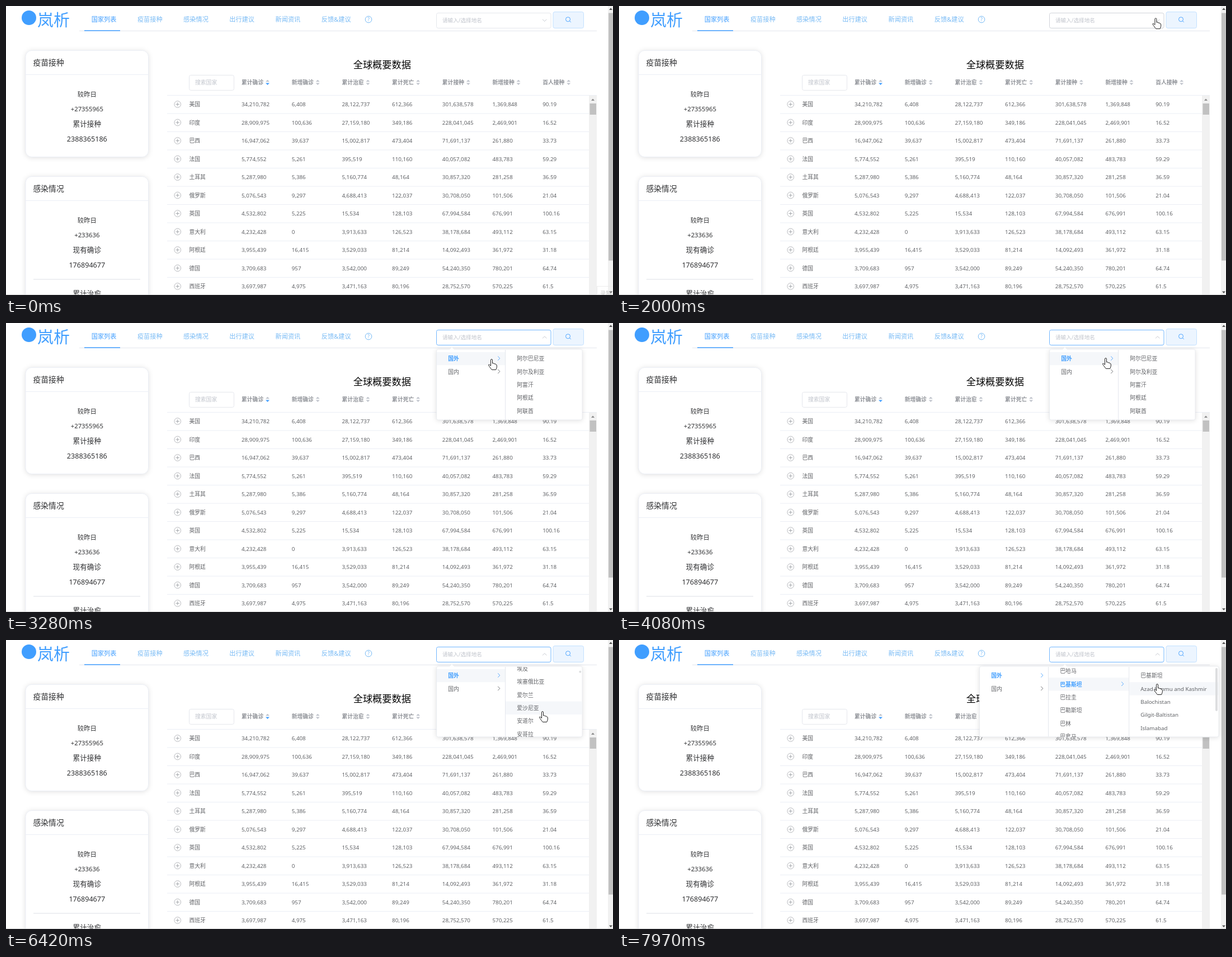
Write an HTML page that moves like this. It is 1085 by 516 pixels and loops after 8 s.

```html
<!DOCTYPE html>
<html lang="zh-CN">
<head>
<meta charset="utf-8">
<style>
html, body { margin: 0; height: 100%; overflow: hidden; background: #fff; }
svg { display: block; }
text { font-family: "Noto Sans", "Noto Sans CJK SC", sans-serif; white-space: pre; }
.box { stroke-width: .75; }
.shadow { filter: drop-shadow(0 1.4px 4px rgba(0, 0, 0, .12)); }
</style>
</head>
<body>
<svg width="1085" height="516" viewBox="0 0 1085 516">
<g id="hover"></g><g id="page"></g><g id="live"></g>
</svg>
<script>
const BLUE = '#409eff', PALE = '#79bbf5', GREY = '#606266', DARK = '#303133', MUTE = '#c0c4cc';
const EDGE = '#dcdfe6', LINE = '#ebeef5', SOFT = '#f5f7fa';
const ROW = 32.5, COL = 89.7, ITEM = 23.4, LOOP = 8000;

// cy is the middle of the line of text
const text = (s, x, cy, size = 9.8, fill = GREY, more = '') =>
  `<text x="${x}" y="${cy + size * .37}" font-size="${size}" fill="${fill}" ${more}>${s}</text>`;
const mid = (s, x, cy, size, fill) => text(s, x, cy, size, fill, 'text-anchor="middle"');
const rect = (x, y, w, h, fill, more = '') =>
  `<rect x="${x}" y="${y}" width="${w}" height="${h}" fill="${fill}" ${more}/>`;
const box = (x, y, w, h, fill, stroke) => rect(x, y, w, h, fill, `rx="3" stroke="${stroke}" class="box"`);
const path = (d, stroke, width = 1, fill = 'none') =>
  `<path d="${d}" fill="${fill}" stroke="${stroke}" stroke-width="${width}"/>`;
const tri = (x, y, w, h, fill) => `<path d="M${x - w} ${y}h${2 * w}l${-w} ${h}z" fill="${fill}"/>`;
const ring = (x, y, r, stroke, width = .8) =>
  `<circle cx="${x}" cy="${y}" r="${r}" fill="none" stroke="${stroke}" stroke-width="${width}"/>`;

// the wording of the table; thousands separators are added when drawn
const countries = `美国 34210782 6408 28122737 612366 301638578 1369848 90.19
印度 28909975 100636 27159180 349186 228041045 2469901 16.52
巴西 16947062 39637 15002817 473404 71691137 261880 33.73
法国 5774552 5261 395519 110160 40057082 483783 59.29
土耳其 5287980 5386 5160774 48164 30857320 281258 36.59
俄罗斯 5076543 9297 4688413 122037 30708050 101506 21.04
英国 4532802 5225 15534 128103 67994584 676991 100.16
意大利 4232428 0 3913633 126523 38178684 493112 63.15
阿根廷 3955439 16415 3529033 81214 14092493 361972 31.18
德国 3709683 957 3542000 89249 54240350 780201 64.74
西班牙 3697987 4975 3471163 80196 28752570 570225 61.5`.split('\n');
const heads = '累计确诊 新增确诊 累计治愈 累计死亡 累计接种 新增接种 百人接种'.split(' ');
const tabs = '国家列表 疫苗接种 感染情况 出行建议 新闻资讯 反馈&amp;建议'.split(' ');
const abroad = '阿尔巴尼亚 阿尔及利亚 阿富汗 阿根廷 阿联酋 阿曼 阿塞拜疆 埃及 埃塞俄比亚 爱尔兰 爱沙尼亚 安道尔 安哥拉 安提瓜和巴布达 奥地利 澳大利亚 巴巴多斯 巴布亚新几内亚 巴哈马 巴基斯坦 巴拉圭 巴勒斯坦 巴林 巴拿马 白俄罗斯'.split(' ');
const regions = ['巴基斯坦', 'Azad Jammu and Kashmir', 'Balochistan', 'Gilgit-Baltistan', 'Islamabad', 'Khyber Pakhtunkhwa'];
const PICK = abroad.indexOf('巴基斯坦');

function card(y, h, title, lines) {
  return rect(35, y, 219.5, h, '#fff', `rx="11" stroke="${LINE}" class="shadow"`) +
    path(`M35 ${y + 43}H254.5`, LINE) + text(title, 48.5, y + 21.5, 13.8, DARK) +
    lines.map((s, i) => mid(s, 144.8, y + 78 + 26.6 * i + (i > 3 ? 24 : 0), i < 2 ? 11.3 : 12.6, DARK)).join('');
}

function drawPage() {
  let s = `<circle cx="41" cy="21" r="13" fill="${BLUE}"/>` + text('岚析', 56, 25, 29, BLUE, 'font-weight="500"');
  s += path('M131 44.5H1056', '#e4e7ed') + path('M140 44H204', BLUE, 1.4);
  tabs.forEach((tab, i) => s += text(tab, 152.7 + 82.2 * i, 24, 11.2, i ? PALE : BLUE));
  s += ring(648, 24, 5.8, PALE, 1) + mid('?', 648, 24, 9, PALE);
  s += box(978, 10.5, 54.5, 29, '#ecf5ff', '#b3d8ff') +
    ring(1004.5, 23.8, 4, BLUE, .9) + path('M1007.4 26.7l2.4 2.4', BLUE, .9);

  s += card(79.5, 190, '疫苗接种', ['较昨日', '+27355965', '累计接种', '2388365186']);
  s += card(304.5, 260, '感染情况', ['较昨日', '+233636', '现有确诊', '176894677', '累计治愈']);
  s += path('M49 488H240', EDGE);

  s += mid('全球概要数据', 672.3, 104.7, 17.2, '#000');
  s += box(327.5, 123.5, 80, 27, '#fff', EDGE) + text('搜索国家', 338, 136.7, 9.8, MUTE);
  heads.forEach((head, i) => {
    const x = 421 + COL * i;
    s += text(head, x, 136.5, 9.8, '#909399', 'font-weight="bold"') +
      tri(x + 46.5, 135.3, 3.5, -3.5, MUTE) + tri(x + 46.5, 137.5, 3.5, 3.5, i ? MUTE : BLUE);
  });
  s += path('M288 159.5H1056', LINE);
  countries.forEach((line, i) => {
    const cy = 175.5 + ROW * i, [name, ...cells] = line.split(' ');
    s += ring(306.7, cy, 5.8, '#a5a8ad') + path(`M303.5 ${cy}h6.4m-3.2 -3.2v6.4`, '#909399', .8);
    s += text(name, 327.5, cy) + path(`M288 ${cy + 16.5}H1042`, LINE);
    cells.forEach((c, j) => s += text(Number(c).toLocaleString('en-US'), 421 + COL * j, cy));
  });
  s += rect(1042, 160, 14, 356, '#f1f1f1') + tri(1049, 169, 3, -3.5, '#8a8a8a') + rect(1043.5, 174, 11.5, 20, '#c1c1c1');
  s += rect(1076, 0, 9, 516, '#f1f1f1') + rect(1077, 12.5, 8, 442, '#c1c1c1') +
    tri(1081, 7, 3, -3.5, '#505050') + tri(1081, 509.5, 3, 3.5, '#505050');
  return s + path('M0 515.5H1085', '#d4d4d4');
}

const ENTER = 260, OPEN = 2060, SECOND = 3000, THIRD = 7380, GLIDE = 380;
// the pointer rests at each stop and glides so as to arrive at the given time
const stops = [[ENTER, 1085, 516], [640, 965, 250], [1010, 889, 13], [1800, 956, 19], [2300, 985, 46], [2550, 895, 57],
  [2980, 868, 65], [3780, 940, 90], [4080, 870, 63], [4600, 927, 119], [5540, 941, 102], [6420, 959, 128],
  [7330, 945, 79], [7830, 962, 79]];

const clamp = p => Math.max(0, Math.min(1, p));
const smooth = p => p * p * (3 - 2 * p);
const easeOut = p => 1 - (1 - p) ** 3;
const part = (t, from, span) => clamp((t - from) / span);

function pointer(t) {
  const i = stops.findIndex(s => s[0] > t);
  if (i < 1) return stops[i < 0 ? stops.length - 1 : 0].slice(1);
  const [t0, x0, y0] = stops[i - 1], [t1, x1, y1] = stops[i], span = Math.min(GLIDE, t1 - t0);
  const k = smooth(part(t, t1 - span, span));
  return [x0 + (x1 - x0) * k, y0 + (y1 - y0) * k];
}

const chevron = (x, y) => path(`M${x - 1.8} ${y - 3.6}l3.6 3.6l-3.6 3.6`, 'currentColor', .9);

function column(items, x, w, o) {
  const s = items.map((name, i) => {
    const cy = 63.6 + ITEM * i - (o.scroll || 0), on = i === o.active;
    const over = Math.abs(o.y - cy) < ITEM / 2 || i === o.focus;
    const arrow = o.arrows || on ? `<g color="${on ? BLUE : GREY}">${chevron(x + w - 11.5, cy - .5)}</g>` : '';
    return (over ? rect(x, cy - ITEM / 2, w, ITEM, SOFT) : '') +
      text(name, x + 20.3, cy, 9.8, on ? BLUE : GREY, on ? 'font-weight="bold"' : '') + arrow;
  }).join('');
  return `<svg x="${x}" y="48" width="${w}" height="125" viewBox="${x} 48 ${w} 125">${s}</svg>`;
}

function menu(t, x, y) {
  const second = t >= SECOND, third = t >= THIRD;
  const left = third ? 644.5 : 769.5, right = third ? 1072 : second ? 1030 : 893.5;
  const split = third ? 768 : 893, end = third ? 912 : right;
  const spin1 = part(t, 4400, 690), spin2 = part(t, 6430, 250);
  const scroll = 176.3 * easeOut(spin1) + 253 * smooth(spin2);
  const moving = spin1 % 1 || spin2 % 1;
  const inside = (a, b) => x > a && x < b && y > 47 && y < 173;
  const k = easeOut(part(t, OPEN, 300));

  let s = rect(left, 47, right - left, 126, '#fff', 'rx="3" stroke="#e4e7ed" class="box shadow"') + tri(797, 47.8, 4.5, -4.3, '#fff');
  s += column(['国外', '国内'], left + .5, split - left - 1, {
    arrows: true, active: second ? 0 : -1, focus: second && !third ? 0 : -1, y: inside(left, split) ? y : -99 });
  if (second) {
    const over = inside(split, end), pick = third ? PICK : -1;
    s += path(`M${split - .5} 48V172.5`, '#e4e7ed');
    s += column(abroad, split, end - split - .5, { scroll, active: pick, focus: pick, y: over && !moving ? y : -99 });
    if (over) s += rect(1024.3, 50 + scroll * .027, 4, 4, '#dddee0', 'rx="2"');
  }
  if (third) {
    const over = inside(end, right);
    s += path(`M${end - .3} 48V172.5`, '#e4e7ed') + column(regions, end, 159.5, { y: over ? y : -99 });
    if (over) s += rect(1066, 50, 4, 77, '#dddee0', 'rx="2"');
  }
  return `<g opacity="${k}" transform="translate(0 ${47 * (1 - k)}) scale(1 ${k})">${s}</g>`;
}

const HAND = 'M-1.5 10V1.2a1.5 1.5 0 0 1 3 0V7q2.6-1 3 1q2.6-1 2.8 1q2 0 2 2v3l-1.6 4.5h-7.4l-4.4-6q-2.4-3-.8-3.4q1.2-.3 3.4 2.4z';
const ARROW = 'M0 0V13.6l3.2-2.9 2.2 5 2.2-1-2.2-4.8H9.8z';

function draw(t) {
  const [x, y] = pointer(t), shown = t >= ENTER, open = t >= OPEN;
  const onInput = shown && x > 769 && x < 974 && y > 12 && y < 40;
  const onMenu = open && y > 52 && y < 173 && x > (t >= THIRD ? 645 : 769) && x < (t >= SECOND ? 1030 : 893);

  const row = Math.floor((y - 159.5) / ROW);
  hover.innerHTML = shown && !open && row >= 0 && x < 1042 ? rect(288, 160 + ROW * row, 754, ROW - 1, SOFT) : '';

  let s = box(769.5, 12.5, 204.5, 27, '#fff', open ? BLUE : onInput ? MUTE : EDGE) +
    text('请输入/选择地名', 780, 25.6, 9.65, MUTE);
  s += `<g transform="rotate(${180 * part(t, OPEN, 300)} 962.7 25.6)">${path('M959 23.8l3.7 3.6l3.7-3.6', MUTE, .9)}</g>`;
  if (t < 400) s += rect(1056.5, 500.5, 30, 18, 'none', 'stroke="#ececec"');
  if (t < 70) s += text('录制', 1062, 513.5, 10, '#c8c8c8');
  if (open) s += menu(t, x, y);
  if (shown) s += `<g transform="translate(${x} ${y})">${path(onInput || onMenu ? HAND : ARROW, '#222', 1, '#fff')}</g>`;
  live.innerHTML = s;
}

const [hover, page, live] = ['hover', 'page', 'live'].map(id => document.getElementById(id));
page.innerHTML = drawPage();
const start = performance.now();
function frame() {
  draw((performance.now() - start) % LOOP);
  requestAnimationFrame(frame);
}
frame();
</script>
</body>
</html>
```
